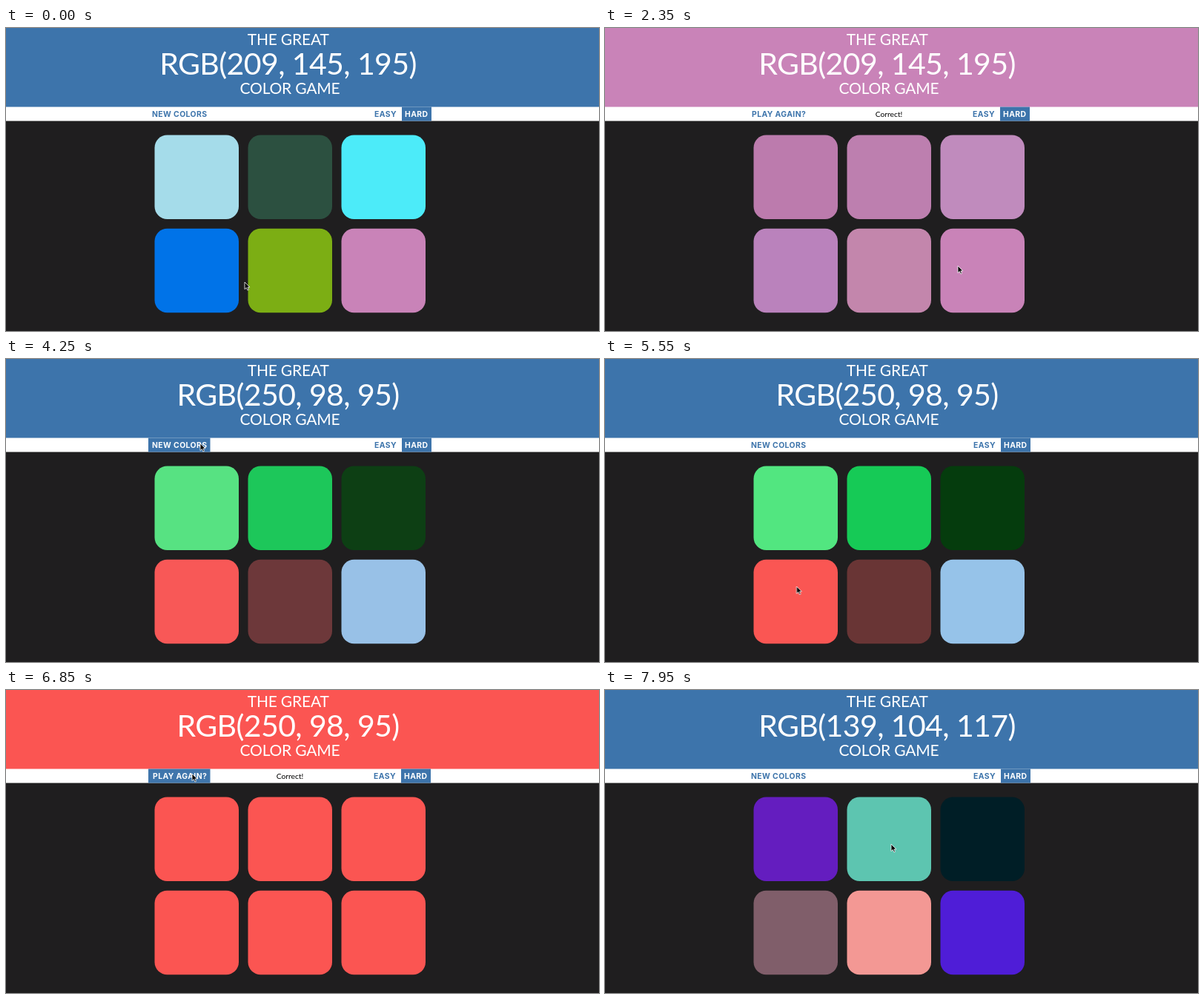
These frames come from a looping animation (800 px wide and 409 px high, 8000 ms). An HTML page:

```html
<!DOCTYPE html>
<html lang="en">
<head>
<meta charset="utf-8">
<title>Color Game</title>
<style>
  html, body { margin: 0; width: 100%; height: 100%; overflow: hidden; background: #1f1e1f; }
  svg { display: block; width: 100vw; height: 100vh; }
  .title { font-family: Lato, sans-serif; fill: #fff; text-anchor: middle; }
  .small { font-size: 21px; letter-spacing: -.2px; }
  .big { font-size: 41px; letter-spacing: -.6px; }
  .nav { font: 700 10.4px Inter, sans-serif; letter-spacing: .4px; }
  .message { font: 10.3px Lato, sans-serif; text-anchor: middle; }
</style>
</head>
<body>
<svg viewBox="0 0 800 409">
  <rect width="800" height="409" fill="#1f1e1f"/>
  <rect id="header" width="800" height="107"/>
  <text class="title small" x="380.7" y="23">THE GREAT</text>
  <g id="goals" class="title big"></g>
  <text class="title small" x="383" y="89.3">COLOR GAME</text>

  <rect y="106.5" width="800" height="19" fill="#fff"/>
  <rect id="hover" x="192" y="106.5" width="83.5" height="19" fill="#3d74ab"/>
  <g id="labels" class="nav"></g>
  <g id="messages" class="message"></g>
  <g id="modes" class="nav">
    <text x="497" y="120" fill="#3d74ab">EASY</text>
    <rect x="534" y="106.5" width="40" height="19" fill="#3d74ab"/>
    <text x="538" y="120" fill="#fff">HARD</text>
  </g>

  <g id="squares"></g>
  <path id="cursor" d="M0 0V9.6L2.3 7.5L3.9 11L5.5 10.3L4 6.9H7Z"
        fill="#000" stroke="#fff" stroke-width=".8" stroke-linejoin="round"/>
</svg>
<script>
const LOOP = 8000;
const MISS = 500, WIN1 = 1950, RESET1 = 3800, WIN2 = 5630, RESET2 = 7270;
const BLUE = '#3d74ab', DARK = '#1f1e1f', PINK = '#c983b8', RED = '#fb5552';
const byId = id => document.getElementById(id);

function add(parent, tag, attrs, text = '') {
  const node = document.createElementNS('http://www.w3.org/2000/svg', tag);
  for (const key in attrs) node.setAttribute(key, attrs[key]);
  node.textContent = text;
  byId(parent).append(node);
  return node;
}

function play(node, frames) {
  node.animate(frames, { duration: LOOP, iterations: Infinity });
}

// Changes a property at each [time, value]; a fade of 0 is a hard cut.
function change(node, prop, start, steps, fade = 0) {
  const frames = [{ offset: 0, [prop]: start }];
  let value = start;
  for (const [time, next] of steps) {
    frames.push({ offset: time / LOOP, [prop]: value, easing: 'ease' },
                { offset: (time + fade) / LOOP, [prop]: next });
    value = next;
  }
  frames.push({ offset: 1, [prop]: value });
  play(node, frames);
}

function showDuring(node, ...spans) {
  const startsOn = spans[0][0] === 0;
  const steps = spans.flatMap(([from, to]) => [[from, 1], [to, 0]])
    .filter(([time]) => time > 0 && time < LOOP);
  change(node, 'opacity', startsOn ? 1 : 0, steps);
}

change(byId('header'), 'fill', BLUE, [[WIN1, PINK], [RESET1, BLUE], [WIN2, RED], [RESET2, BLUE]]);

[['209, 145, 195', 0, RESET1], ['250, 98, 95', RESET1, RESET2], ['139, 104, 117', RESET2, LOOP]]
  .forEach(([rgb, from, to]) =>
    showDuring(add('goals', 'text', { x: 380.5, y: 63 }, `RGB(${rgb})`), [from, to]));

const won = [[WIN1, RESET1], [WIN2, RESET2]];
showDuring(add('labels', 'text', { x: 197, y: 120 }, 'NEW COLORS'),
  [0, WIN1], [RESET1, WIN2], [RESET2, LOOP]);
showDuring(add('labels', 'text', { x: 198, y: 120 }, 'PLAY AGAIN?'), ...won);
showDuring(add('messages', 'text', { x: 384, y: 120 }, 'Try Again'), [MISS, WIN1]);
showDuring(add('messages', 'text', { x: 383, y: 120 }, 'Correct!'), ...won);
change(byId('modes'), 'transform', 'translateX(0px)',
  won.flatMap(([from, to]) => [[from, 'translateX(-1px)'], [to, 'translateX(0px)']]));

const hoverSteps = (on, off) => [[3150, on], [4400, off], [6600, on], [7560, off]];
change(byId('hover'), 'opacity', 0, hoverSteps(1, 0), 300);
change(byId('labels'), 'fill', BLUE, hoverSteps('#fff', BLUE), 300);

const rounds = [
  ['#a5dcea', '#2c5040', '#4cebf9', '#0073e8', '#7cae14', PINK],
  ['#52e680', '#16ca56', '#053c0d', '#fa5653', '#693535', '#96c3e9'],
  ['#641dbf', '#5dc5b0', '#001e26', '#805e6a', '#f39894', '#4f1dd7']
];
for (let i = 0; i < 6; i++) {
  const square = add('squares', 'rect', {
    x: 200.5 + i % 3 * 126, y: 144.5 + Math.floor(i / 3) * 126.3,
    width: 113.5, height: 113.5, rx: 17
  });
  const miss = i === 0 ? [[MISS, DARK]] : [];
  change(square, 'fill', rounds[0][i], [...miss,
    [WIN1, PINK], [RESET1, rounds[1][i]], [WIN2, RED], [RESET2, rounds[2][i]]], 600);
}

const path = [
  [0, 322, 343], [450, 277, 223], [1250, 277, 223], [1850, 476, 321],
  [2450, 476, 321], [3300, 262, 114], [4260, 262, 114], [5200, 258.5, 307],
  [6050, 258.5, 307], [6750, 251, 113], [7460, 251, 113], [7900, 386, 208], [LOOP, 386, 208]
];
play(byId('cursor'), path.map(([time, x, y]) => ({
  offset: time / LOOP, transform: `translate(${x}px, ${y}px)`, easing: 'ease-in-out'
})));
</script>
</body>
</html>
```
